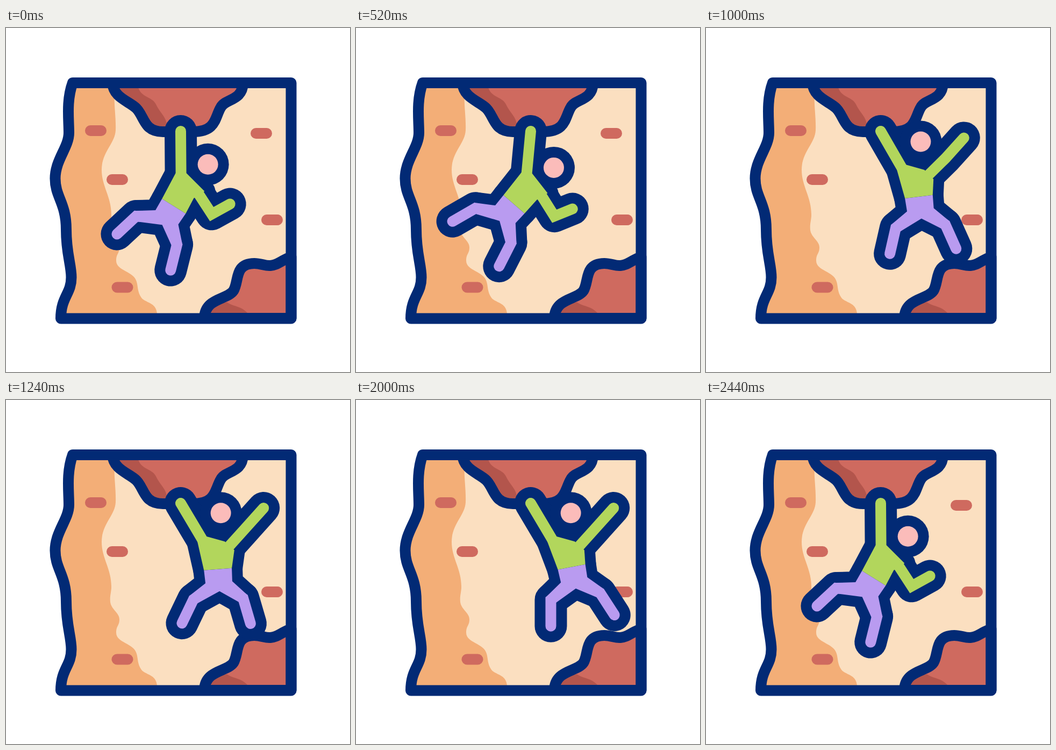
Write an HTML page that moves like this. It is 640 by 640 pixels and loops after 2480 ms.

```html
<!DOCTYPE html>
<html lang="en">
<head>
<meta charset="utf-8">
<title>Climber</title>
<style>
  html, body { margin: 0; width: 100%; height: 100%; overflow: hidden; background: #fff; }
  svg { display: block; width: 100vw; height: 100vh; }
  .line { fill: none; stroke: #022a75; stroke-width: 20; stroke-linejoin: round; }
  .rock { fill: #cf6a5f; }
  .shade { fill: #b3554c; }
  .limb { fill: none; stroke-linecap: round; }
  #outline { fill: #022a75; stroke: #022a75; stroke-linejoin: round; }
  #outline .limb { stroke-width: 60; }
  #outline .body { stroke-width: 40; }
  #outline .head { stroke: none; }
  #colour .limb { stroke-width: 20; }
  #colour .arm { stroke: #b2d65c; }
  #colour .leg { stroke: #b99bf0; }
  #colour .torso { fill: #b2d65c; }
  #colour .hips { fill: #b99bf0; }
  #colour .head { fill: #fbbcba; }
</style>
</head>
<body>
<svg viewBox="0 0 640 640">
  <defs>
    <path id="wall" d="M124 102H530.5V540.5H102C102 500 121.5 495 121.5 464C121.5 440 112 420 112 375C112 325 91.5 315 91.5 280C91.5 245 117 222 117 195C117 170 112 135 124 102Z"/>
    <path id="ledge" d="M198 102C200 130 229 136 242.5 149.5C258 165 256 193 292 193H348C392 193 388 166 400 147C409 131 440 136 441 102Z"/>
    <path id="boulder" d="M369 540C370 502 411 506 423 489C434 472 424 438 462 438C475 438 482 443 492 442C506 441 512 432 530.5 426V540Z"/>
    <clipPath id="inside"><use href="#wall"/></clipPath>
  </defs>
  <use href="#wall" fill="#fbdfc0"/>
  <path clip-path="url(#inside)" fill="#f3ae77" d="M80 102H203C199 140 205 160 204 190C203 215 178 230 178 264C178 295 197 315 196 350C195 362 193 365 194 376C196 390 211 396 211 408C211 420 205 420 205 433C205 452 238 452 243 472C246 482 244 490 252 502C260 512 279 510 281 531V540H80Z"/>
  <g id="holds" class="rock"></g>
  <use href="#ledge" class="rock"/>
  <path class="shade" d="M198 104H245C247 130 271 126 279 142C288 161 300 165 300 188H290C256 193 258 165 243 149C230 135 199 128 198 104Z"/>
  <use href="#boulder" class="rock"/>
  <path class="shade" d="M372 536C383 508 400 512 411 510C425 520 440 516 454 536Z"/>
  <use href="#ledge" class="line"/>
  <use href="#boulder" class="line"/>
  <use href="#wall" class="line"/>
  <g id="outline"></g>
  <g id="colour"></g>
</svg>
<script>
const LOOP = 2480, STEP = 40;
const GRIP = [325, 192];
const $ = id => document.getElementById(id);

$('holds').innerHTML = [[147, 181], [187, 272], [196.5, 472.5], [455, 186], [475, 347]]
  .map(([x, y]) => `<rect x="${x}" y="${y}" width="40" height="20" rx="10"/>`).join('');

// Angles in degrees: 0 points down, positive turns clockwise. Shins are relative to the hips.
const pose = (chest, hips, upperArm, forearm, shinL, shinR) =>
  [chest, hips, upperArm, forearm, shinL, shinR];
const caught = (hips, shinL, shinR) => pose(-4.5, hips, -138, -138, shinL, shinR);

const hang = pose(32, 32, -33, -119, 15, -18);
const wind = pose(39, 41, -32, -112, 19, -14);
const leap = pose(9, 9, -92, -137, 19, -18);
const swayRight = caught(-11, 11, -22);
const keys = [
  [0, hang], [200, hang], [520, wind], [840, leap],
  [1040, caught(-8, 20, -17)], [1240, caught(-4.3, 30, -12)], [1560, caught(2, 23, 4)],
  [2000, swayRight], [2220, leap], [2440, hang], [LOOP, hang]
];

// Monotone cubic: flat at turning points, smooth in between.
function slope(k, i) {
  if (k < 1 || k > keys.length - 2) return 0;
  const rate = n => (keys[n + 1][1][i] - keys[n][1][i]) / (keys[n + 1][0] - keys[n][0]);
  const a = rate(k - 1), b = rate(k);
  return a * b <= 0 ? 0 : 2 * a * b / (a + b);
}
function sample(t) {
  let k = 0;
  while (k < keys.length - 2 && t >= keys[k + 1][0]) k++;
  const [t0, p] = keys[k], [t1, q] = keys[k + 1];
  const h = t1 - t0, s = (t - t0) / h, r = 1 - s;
  return p.map((v, i) =>
    v * (1 + 2 * s) * r * r + q[i] * s * s * (3 - 2 * s) +
    h * s * r * (slope(k, i) * r - slope(k + 1, i) * s));
}

function go([x, y], angle, length) {
  const a = angle * Math.PI / 180;
  return [x - length * Math.sin(a), y + length * Math.cos(a)];
}
const line = (...pts) => 'M' + pts.map(p => p.map(v => v.toFixed(2)).join(' ')).join('L');

function leg(at, hips, side, thighTurn, thighLength, shinTurn) {
  const thigh = hips + thighTurn;
  const hip = at(12.5 * side, 33), knee = go(hip, thigh, thighLength);
  return {
    path: line(hip, knee, go(knee, hips + shinTurn, 49)),
    outer: go(knee, thigh - 90 * side, 10),
    inner: go(knee, thigh + 90 * side, 10)
  };
}

// The body hangs from the grip; chest and hips swing the rest along.
function build(t) {
  const [chest, hips, upperArm, forearm, shinL, shinR] = sample(t);
  const reach = 0.83 * chest - 27;
  const shoulderL = go(GRIP, reach, 78);
  const shoulderR = go(shoulderL, chest - 72, 52.5);
  const elbow = go(shoulderR, upperArm, 43);
  const waist = go(shoulderL, 1.1 * hips - 23, 63);
  const at = (x, y) => go(go(waist, hips - 90, x), hips, y);
  const left = leg(at, hips, -1, 62, 42, shinL);
  const right = leg(at, hips, 1, -51, 39, shinR);
  return {
    head: go(shoulderL, chest - 140, 59 - 0.2 * chest),
    shapes: {
      legL: left.path,
      legR: right.path,
      hips: line(at(-26, 0), at(-25, 24.5), left.outer, left.inner, at(0, 41),
        right.inner, right.outer, at(25, 24.5), at(26, 0)) + 'Z',
      armL: line(GRIP, shoulderL),
      armR: line(shoulderR, elbow, go(elbow, forearm, 50 - 0.35 * chest)),
      torso: line(go(shoulderL, reach + 90, 10), go(shoulderL, reach - 90, 10),
        go(shoulderR, upperArm - 90, 12), go(shoulderR, upperArm + 90, 12),
        at(26, 0), at(-26, 0)) + 'Z'
    }
  };
}

const parts = ['limb leg legL', 'limb leg legR', 'body hips', 'limb arm armL', 'limb arm armR', 'body torso'];
const layers = [['outline', 39], ['colour', 19]].map(([id, r]) => {
  $(id).innerHTML = parts.map(c => `<path class="${c}"/>`).join('') + `<circle class="head" r="${r}"/>`;
  return $(id);
});

function draw(t) {
  const { head, shapes } = build(t);
  for (const layer of layers) {
    for (const name in shapes) layer.querySelector('.' + name).setAttribute('d', shapes[name]);
    const circle = layer.querySelector('.head');
    circle.setAttribute('cx', head[0]);
    circle.setAttribute('cy', head[1]);
  }
}

const start = performance.now();
function tick() {
  const t = (performance.now() - start) % LOOP;
  draw(Math.floor(t / STEP) * STEP);
  requestAnimationFrame(tick);
}
tick();
</script>
</body>
</html>
```
